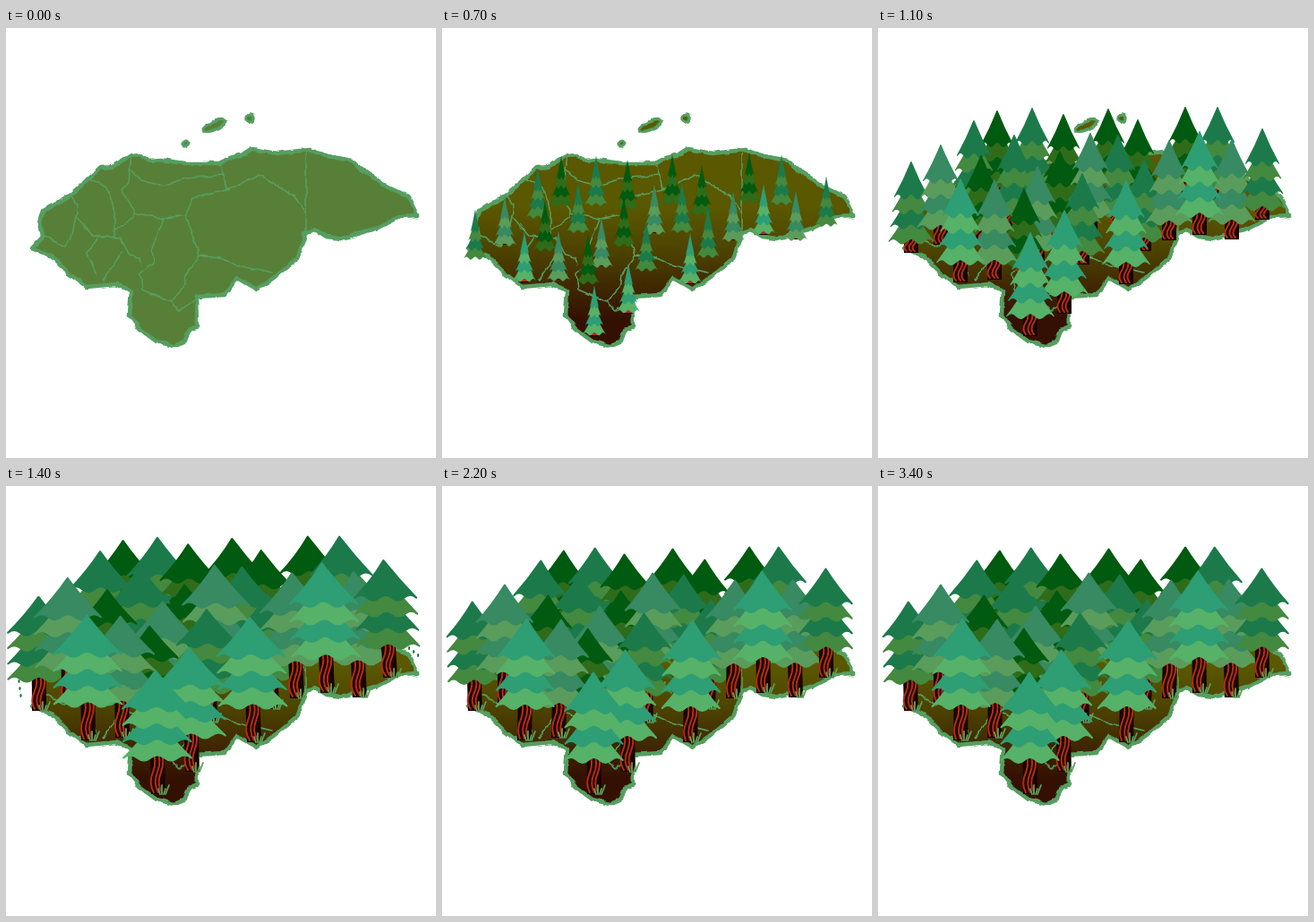
An HTML page that plays this animation: 480x480 px, repeating every 3.5 s.

```html
<!DOCTYPE html>
<html lang="en">
<head>
<meta charset="utf-8">
<title>Growing forest</title>
<style>
  html, body { margin: 0; width: 100%; height: 100%; overflow: hidden; background: #fff; }
  svg { display: block; width: 100vw; height: 100vh; }
</style>
</head>
<body>
<svg id="stage" viewBox="0 0 480 480" stroke-linejoin="round" stroke-linecap="round">
  <defs>
    <linearGradient id="young" x1="0" x2="1" y1=".7" y2=".45">
      <stop offset="0" stop-color="#537432"/>
      <stop offset=".4" stop-color="#56600f"/>
      <stop offset="1" stop-color="#575c08"/>
    </linearGradient>
    <linearGradient id="soil" gradientUnits="userSpaceOnUse" x1="0" x2="0" y1="200" y2="325">
      <stop offset="0" stop-color="#5a5800"/>
      <stop offset=".4" stop-color="#4c4202"/>
      <stop offset="1" stop-color="#341003"/>
    </linearGradient>
    <filter id="rough" color-interpolation-filters="sRGB">
      <feTurbulence type="fractalNoise" baseFrequency=".09" numOctaves="2" seed="4"/>
      <feDisplacementMap in="SourceGraphic" scale="5" xChannelSelector="R" yChannelSelector="G"/>
    </filter>
  </defs>
  <g id="land" filter="url(#rough)"></g>
  <g id="forest"></g>
  <g id="flecks" fill="#1c7a4a"></g>
</svg>
<script>
const LOOP = 3500, STEP = 100;
const $ = id => document.getElementById(id);
const lerp = (a, b, k) => a + (b - a) * k;
const clamp = v => Math.min(1, Math.max(0, v));
const ease = k => k * k * (3 - 2 * k);

function set(el, attrs) {
  for (const k in attrs) el.setAttribute(k, attrs[k]);
}
function add(parent, tag, attrs = {}) {
  const el = document.createElementNS('http://www.w3.org/2000/svg', tag);
  set(el, attrs);
  return parent.appendChild(el);
}

// Land
const COAST =
  'M29 246L41 233 38 218 42 204 72 186 94 166 106 156 118 155 140 142 150 141 158 148 172 147 200 151 238 151 ' +
  '250 145 266 141 275 135 302 140 338 136 360 143 386 148 402 161 425 177 450 189 460 209 440 210 415 223 ' +
  '374 235 358 233 345 225 334 230 325 258 308 272 280 292 258 279 244 298 213 300 214 333 204 337 200 350 ' +
  '188 355 168 350 149 336 138 321 140 293 122 286 90 289 70 274 50 254Z';
const BORDERS =
  'M72 186L80 198 78 210 97 232 128 234 138 254 148 256 150 264M78 210L74 230M40 230L66 244 74 230' +
  'M94 168L112 178 121 204 121 232M140 142L137 170 129 182 142 202 142 212 122 226' +
  'M138 158L150 170 175 176 200 168 243 164 238 152M243 164L246 181 208 190 200 208 176 213 142 206' +
  'M246 181L284 164 322 188 334 206M335 136V228M200 208L216 254 240 257 255 264 296 274' +
  'M216 254L200 276 198 290 184 306 152 292M176 213L163 246 165 262 150 274 152 292' +
  'M103 234L90 252 102 276M130 250L108 282M184 306L194 316 212 301';

const land = $('land');
const coast = add(land, 'path', { d: COAST });
const borders = add(land, 'path', { d: BORDERS, fill: 'none', stroke: '#559f60', 'stroke-width': 1.5 });
const isle = (x, y, rx, ry) => add(land, 'ellipse', { cx: x, cy: y, rx, ry, transform: `rotate(-22 ${x} ${y})` });
const isles = [isle(200, 129, 4, 2.5), isle(232.5, 109, 13, 4.5), isle(272, 101, 4, 4)];

function drawLand(n) {
  const seeded = n === 4;
  const stroke = seeded ? '#52843b' : '#559f60';
  const fill = n < 2 ? '#587f37' : n < 4 ? '#576f22' : seeded ? 'url(#young)' : 'url(#soil)';
  set(coast, { fill, stroke, 'stroke-width': seeded ? 3 : 4.6 });
  isles.forEach(e => set(e, { fill: n < 2 ? '#587f37' : '#575c08', stroke, 'stroke-width': 3.5 }));
  set(borders, { opacity: seeded ? 0 : n === 2 || n === 3 ? .6 : 1 });
}

// Trees: a tone and the grown tip, back to front
const TONES = {
  D: { colors: ['#005a10', '#2f6c1a'], half: 28, tall: 118 },
  M: { colors: ['#1c7a4a', '#43893f'], half: 30, tall: 124 },
  S: { colors: ['#378a62', '#5a9c5c'], half: 32, tall: 134 },
  L: { colors: ['#2e9e74', '#56b268'], half: 33, tall: 138 }
};
const TIPS =
  'D133,70 M107,81 M172,67 D207,74 D257,68 D290,80 D343,66 M379,66 M152,97 D203,115 M268,97 M297,125 D115,120 S237,95 ' +
  'S395,102 S325,103 S178,132 D163,157 M228,140 S130,147 M429,90 M37,127 S70,108 L359,93 L92,146 L277,148 L208,181 L170,206';

const trees = TIPS.split(' ').map(spec => {
  const { colors, half, tall } = TONES[spec[0]];
  const [x, y] = spec.slice(1).split(',').map(Number);
  const g = add($('forest'), 'g');
  const line = (stroke, width) => add(g, 'path', { fill: 'none', stroke, 'stroke-width': width });
  const tree = {
    g, x, y, half, base: y + tall,
    seed: line('#220600', 2.6),
    trunk: add(g, 'path', { fill: '#180302' }),
    bark: line('#b92c12', 2),
    grass: line('#5a9f5a', 1.8),
    tiers: []
  };
  for (let k = 3; k >= 0; k--) {
    const c = colors[k % 2];
    tree.tiers[k] = add(g, 'path', { fill: c, stroke: c });
  }
  return tree;
});

function tierPath(axis, y, w, h) {
  const top = y - .43 * h, cx = axis(y), s = .4 * w, ctl = y - .2 * h;
  return `M${axis(top)} ${top}Q${cx + .45 * w} ${ctl} ${cx + w} ${y}` +
    `q${-s / 2} ${-.06 * h} ${-s} 0` + `t${-s} 0`.repeat(4) +
    `Q${cx - .45 * w} ${ctl} ${axis(top)} ${top}Z`;
}

function drawTree(t, p) {
  const { x, base } = t;
  const r = .8 + .3 * Math.sin(x);
  set(t.seed, { d: p.n === 4 ? `M${x - 2 * r} ${base - 8 - 4 * r}l${2 * r} ${8 * r}l${2 * r} ${-7 * r}` : '' });
  t.g.style.display = p.n < 4 ? 'none' : '';
  const parts = [...t.tiers, t.trunk, t.bark, t.grass];
  parts.forEach(el => el.style.display = p.grow ? '' : 'none');
  if (!p.grow) return;

  // A gust runs across the forest; the far trees stretch most
  const gust = 3.5 * Math.sin((x - 70) / 29) * p.sway;
  const stretch = p.over * Math.max(0, 160 - t.y) * .1;
  const tipX = x + (gust - p.over * x / 55) * p.morph;
  const tipY = lerp(lerp(base, t.y + 45, p.grow), t.y + 2.5 * p.sway - stretch, p.morph);
  const h = lerp(90 * p.grow, t.half * 3 + stretch, p.morph);
  const axis = y => x + (tipX - x) * (base - y) / (base - tipY);

  t.tiers.forEach((el, k) => {
    const w = lerp((8 + 4.2 * k) * p.grow, t.half * (1 + .18 * p.over) - 1, p.morph);
    set(el, {
      d: tierPath(axis, tipY + h * (.43 + .185 * k), w, h),
      'stroke-width': lerp(.3, 2, p.morph)
    });
  });

  const top = Math.min(base - 4, tipY + h * .9), len = base - top;
  const w = 8 * p.grow, x0 = axis(top);
  set(t.trunk, { d: `M${x0 - w} ${top}H${x0 + w}L${x + w} ${base}H${x - w}Z` });
  const streak = dx => `M${x0 + dx} ${top}q5 ${len / 4} 0 ${len / 2}t${x - x0} ${len / 2 - 2}`;
  set(t.bark, { d: [-5, 0, 4].map(dx => streak(dx * p.grow)).join('') });
  const blade = k => `M${x + 2 + 2 * k} ${base}l${2 * k - 2} ${-6 - 4 * (k % 2)}`;
  set(t.grass, { d: p.morph > .5 ? [0, 1, 2, 3].map(blade).join('') : '' });
}

// Loose needles beside the outermost trees
for (let i = 0; i < 6; i++) {
  const left = i % 2;
  add($('flecks'), 'ellipse', { cx: left ? 14 + i / 2 : 450 + 2.5 * i, cy: left ? 214 + 4 * i : 181 + 2 * i, rx: 1.2, ry: 2 });
}

// Pose for one tenth of a second
function pose(n) {
  return {
    n,
    grow: clamp((n - 4) / 5),
    morph: ease(clamp((n - 9) / 4)),
    over: clamp(1 - Math.abs(n - 14) * .6),
    sway: n < 16 ? 0 : [0, .5, 1, 0][n % 4]
  };
}

let last = -1;
function draw(ms) {
  const n = Math.floor(ms % LOOP / STEP);
  if (n === last) return;
  last = n;
  const p = pose(n);
  drawLand(n);
  trees.forEach(t => drawTree(t, p));
  $('flecks').style.display = p.over ? '' : 'none';
}

const start = performance.now();
function tick() {
  draw(performance.now() - start);
  requestAnimationFrame(tick);
}
tick();
</script>
</body>
</html>
```
